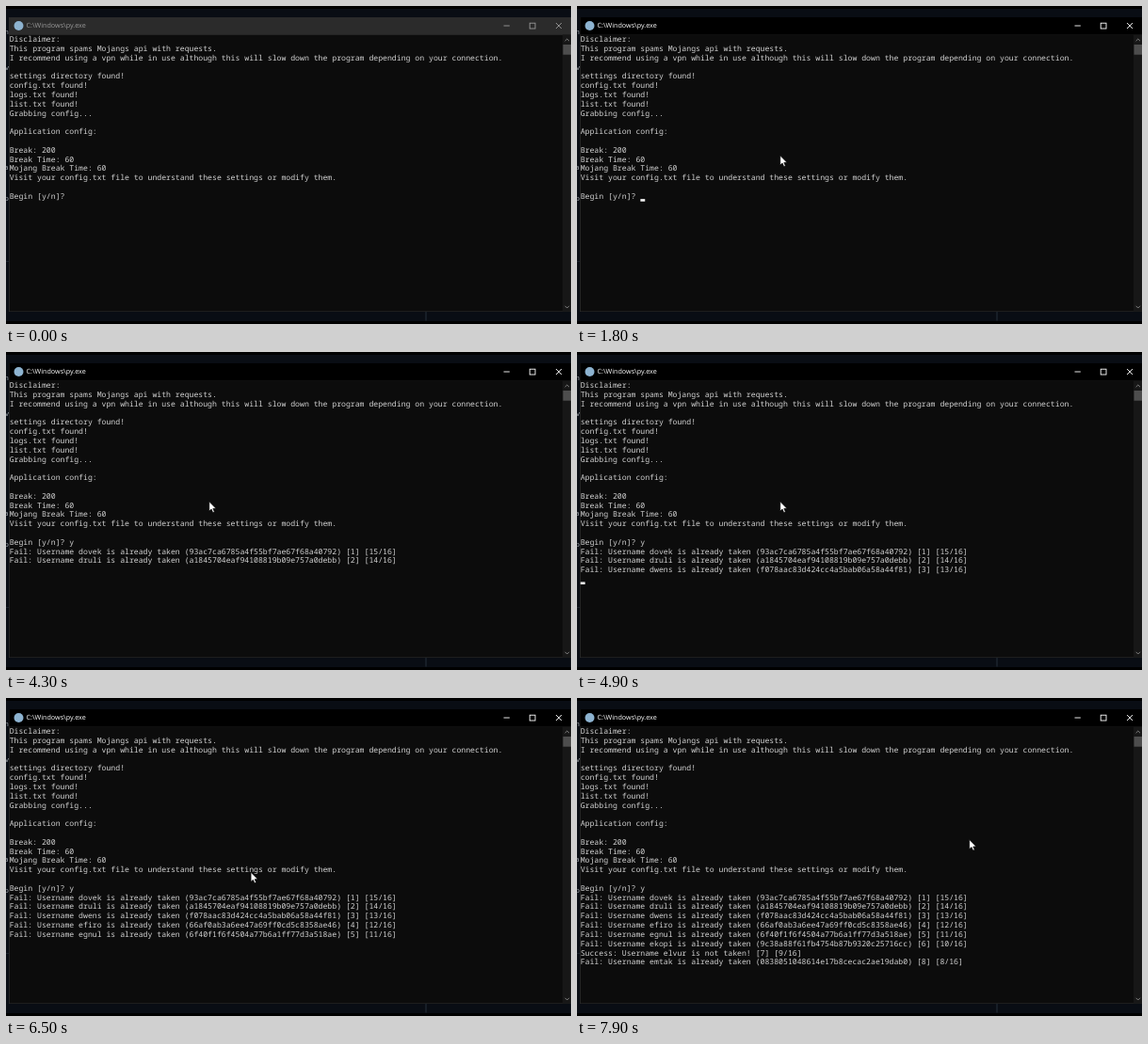
These frames come from a looping animation (600 px wide and 338 px high, 8 s). An HTML page with a canvas:

```html
<!DOCTYPE html>
<html lang="en">
<head>
<meta charset="utf-8">
<title>Console</title>
<style>
  html, body { margin: 0; width: 100%; height: 100%; overflow: hidden; background: #000; }
  #stage { position: relative; width: 600px; height: 338px; overflow: hidden; }
  canvas { position: absolute; left: 0; top: 0; }
  #title, #log { position: absolute; margin: 0; white-space: pre; text-rendering: geometricPrecision; }
  #title { left: 21.5px; top: 15px; font: 7.2px/12px "Open Sans", sans-serif; }
  #log { left: 3.7px; top: 31px; color: #d2d2d2; font: 500 8.16px/9.82px "Noto Sans Mono", monospace; font-variant-ligatures: none; }
</style>
</head>
<body>
<div id="stage">
  <canvas id="back" width="600" height="338"></canvas>
  <div id="title">C:\Windows\py.exe</div>
  <pre id="log"></pre>
  <canvas id="front" width="600" height="338"></canvas>
</div>
<script>
const LOOP = 8000, STEP = 100;
const COL = 4.896, ROW = 9.82, LEFT = 3.7, BASE = 39.4;
const FOCUS = 1100, TYPED = 2400, ENTERED = 2700;

const $ = id => document.getElementById(id);
const back = $('back').getContext('2d');
const front = $('front').getContext('2d');

const intro = `Disclaimer:
This program spams Mojangs api with requests.
I recommend using a vpn while in use although this will slow down the program depending on your connection.

settings directory found!
config.txt found!
logs.txt found!
list.txt found!
Grabbing config...

Application config:

Break: 200
Break Time: 60
Mojang Break Time: 60
Visit your config.txt file to understand these settings or modify them.

Begin [y/n]? `;

// user name and id; a name without an id is free
const checks = [
  'dovek 93ac7ca6785a4f55bf7ae67f68a40792',
  'druli a1845704eaf94108819b09e757a0debb',
  'dwens f078aac83d424cc4a5bab06a58a44f81',
  'efiro 66af0ab3a6ee47a69ff0cd5c8358ae46',
  'egnul 6f40f1f6f4504a77b6a1ff77d3a518ae',
  'ekopi 9c38a88f61fb4754b87b9320c25716cc',
  'elvur',
  'emtak 0838051048614e17b8cecac2ae19dab0'
];

// a steady pace that quickens after the fifth reply
const checkTime = i => i < 5 ? 3500 + 700 * i : 6800 + 300 * (i - 5);

const blinks = [
  { at: 1700, dur: 500 },
  { at: TYPED, dur: 300 },
  { at: 2800, dur: 500 },
  { at: checkTime(2), dur: 1400 }
];

// the pointer enters at ENTRY, then eases to each stop
const ENTRY = { x: 39, y: 193 };
const moves = [
  { at: 100, dur: 600, x: 176.3, y: 28.7 },
  { at: 1000, dur: 800, x: 215.3, y: 158.8 },
  { at: 5800, dur: 300, x: 231.5, y: 176 },
  { at: 6100, dur: 400, x: 259.6, y: 185 },
  { at: 7100, dur: 400, x: 416.2, y: 150.3 }
];

const during = t => ({ at, dur }) => t >= at && t < at + dur;
const ease = u => u * u * (3 - 2 * u);

function checkLine(check, i) {
  const [name, id] = check.split(' ');
  const tail = `[${i + 1}] [${15 - i}/16]\n`;
  return id
    ? `Fail: Username ${name} is already taken (${id}) ${tail}`
    : `Success: Username ${name} is not taken! ${tail}`;
}

function logText(t) {
  const lines = checks.map(checkLine).filter((_, i) => t >= checkTime(i));
  return intro + (t >= TYPED ? 'y' : '') + (t >= ENTERED ? '\n' : '') + lines.join('');
}

function pointerAt(t) {
  let { x, y } = ENTRY;
  for (const m of moves) {
    const k = ease(Math.min(1, Math.max(0, (t - m.at) / m.dur)));
    x += (m.x - x) * k;
    y += (m.y - y) * k;
  }
  return { x, y };
}

function box(c, color, x, y, w, h) {
  c.fillStyle = color;
  c.fillRect(x, y, w, h);
}

function line(c, color, ...pts) {
  c.strokeStyle = color;
  c.lineWidth = 0.9;
  c.beginPath();
  pts.forEach(([x, y]) => c.lineTo(x, y));
  c.stroke();
}

function drawDesktop(c) {
  box(c, '#000', 0, 0, 600, 338);
  box(c, '#090d14', 0, 3, 600, 332);
  box(c, '#27303a', 445.5, 325, 1, 9.5);
  box(c, '#1b222b', 0, 271, 3, 1);
  // letters of the window behind, cut off by the console
  c.font = '8px "Open Sans", sans-serif';
  c.fillStyle = '#a5aab0';
  c.fillText('n', -2, 30);
  c.fillText('v', -1, 68);
  c.fillText('a', -2, 174);
  c.fillText('p', -2, 207);
}

function chevron(c, y, dir) {
  line(c, '#8a8a8a', [593.6, y - dir], [595.8, y + dir], [598, y - dir]);
}

function drawWindow(c, active) {
  box(c, '#303030', 3, 12, 597, 313);
  box(c, '#0c0c0c', 3.7, 30.5, 596.3, 294);
  box(c, active ? '#000' : '#2b2b2b', 3.3, 12, 596.7, 18.5);

  c.fillStyle = '#8db3d0';
  c.beginPath();
  c.arc(13.5, 21, 5, 0, Math.PI * 2);
  c.fill();

  const ink = active ? '#fff' : '#999';
  line(c, ink, [528.5, 21], [534.8, 21]);
  c.strokeRect(556.2, 18.2, 5.8, 5.8);
  line(c, ink, [584, 18], [590, 24]);
  line(c, ink, [590, 18], [584, 24]);

  box(c, '#171717', 591, 30.5, 9, 294);
  box(c, '#4d4d4d', 591.5, 41, 8.5, 10.7);
  chevron(c, 36.1, -1.1);
  chevron(c, 319.9, 1.1);
}

function drawPointer(c, { x, y }) {
  const shape = new Path2D('M0 0V10L2.3 8 3.9 11.5 5.6 10.8 4 7.4 7.1 7.2Z');
  c.save();
  c.translate(x + 0.5, y + 0.3);
  c.fillStyle = '#fff';
  c.strokeStyle = '#000';
  c.lineWidth = 0.6;
  c.fill(shape);
  c.stroke(shape);
  c.restore();
}

function drawCaret(c, text) {
  const rows = text.split('\n');
  const row = rows.length - 1, col = rows[row].length;
  box(c, '#f2f2f2', LEFT + col * COL, BASE + row * ROW - 1.2, COL, 2.6);
}

function render(t) {
  const active = t >= FOCUS;
  drawDesktop(back);
  drawWindow(back, active);
  $('title').style.color = active ? '#fff' : '#999';

  const text = logText(t);
  if ($('log').textContent !== text) $('log').textContent = text;

  front.clearRect(0, 0, 600, 338);
  if (blinks.some(during(t))) drawCaret(front, text);
  if (t >= moves[0].at) drawPointer(front, pointerAt(t));
}

let start = null, shown = -1;
function tick(now) {
  if (start === null) start = now;
  const t = Math.floor((now - start) % LOOP / STEP) * STEP;
  if (t !== shown) render(shown = t);
  requestAnimationFrame(tick);
}
render(0);
requestAnimationFrame(tick);
</script>
</body>
</html>
```
